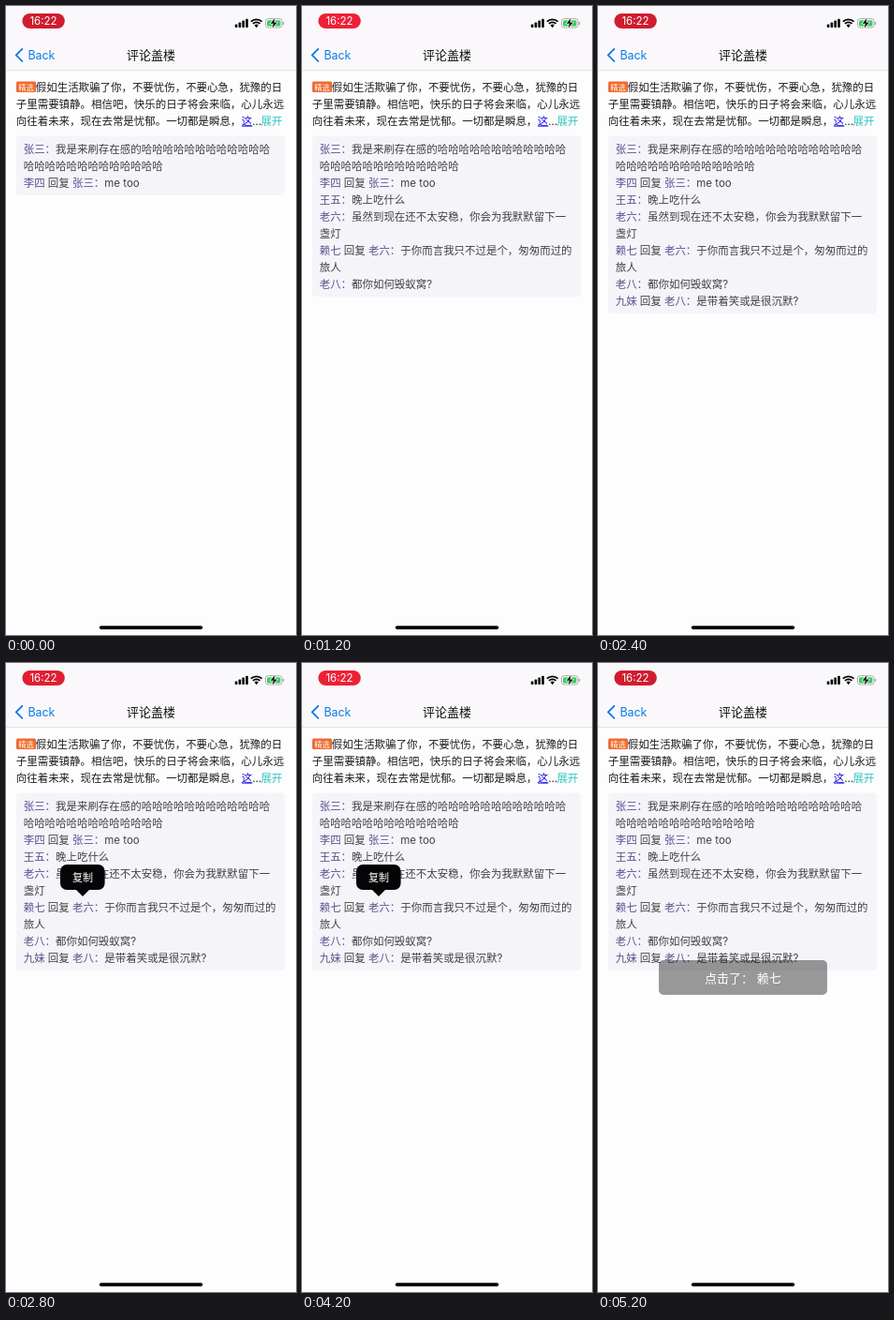
Write an HTML page with a canvas that moves like this. It is 310x671 px and loops after 5.4 s.

```html
<!DOCTYPE html>
<html lang="zh-CN">
<head>
<meta charset="utf-8">
<title>评论盖楼</title>
<style>
html, body { margin: 0; width: 100%; height: 100%; overflow: hidden; background: #fefdfe; }
canvas { display: block; width: 310px; height: 671px; }
</style>
</head>
<body>
<canvas id="stage"></canvas>
<script>
const W = 310, H = 671, LOOP = 5400, STEP = 200;
const CJK = '"Noto Sans CJK SC", "Noto Sans CJK", sans-serif';
const MIXED = 'Inter, ' + CJK;
const SIZE = 11.46, LINE = 18;
const NAME = '#57528c', INK = '#424044', BLUE = '#0b7be6';

// Each comment: time it appears, then its lines; names are wrapped in brackets.
const comments = [
  { at: 0, lines: ['[张三：]我是来刷存在感的' + '哈'.repeat(12), '哈'.repeat(13)] },
  { at: 0, lines: ['[李四] 回复 [张三：]me too'] },
  { at: 400, lines: ['[王五：]晚上吃什么'] },
  { at: 600, lines: ['[老六：]虽然到现在还不太安稳，你会为我默默留下一', '盏灯'] },
  { at: 1000, lines: ['[赖七] 回复 [老六：]于你而言我只不过是个，匆匆而过的', '旅人'] },
  { at: 1200, lines: ['[老八：]都你如何毁蚁窝?'] },
  { at: 1400, lines: ['[九妹] 回复 [老八：]是带着笑或是很沉默?'] }
];

const canvas = document.getElementById('stage');
const ctx = canvas.getContext('2d');
const dpr = window.devicePixelRatio || 1;
canvas.width = Math.round(W * dpr);
canvas.height = Math.round(H * dpr);

function box(x, y, w, h, r, fill) {
  ctx.fillStyle = fill;
  ctx.beginPath();
  ctx.roundRect(x, y, w, h, r);
  ctx.fill();
}

function text(str, x, y, size, color, { align = 'left', weight = 400, family = MIXED } = {}) {
  ctx.font = `${weight} ${size}px ${family}`;
  ctx.textAlign = align;
  ctx.fillStyle = color;
  ctx.fillText(str, x, y);
  return ctx.measureText(str).width;
}

function richLine(str, x, y) {
  for (const part of str.split(/(\[.*?\])/)) {
    if (!part) continue;
    const named = part[0] === '[';
    x += text(named ? part.slice(1, -1) : part, x, y, SIZE, named ? NAME : INK);
  }
}

function poly(points, fill) {
  ctx.fillStyle = fill;
  ctx.beginPath();
  points.forEach(([x, y]) => ctx.lineTo(x, y));
  ctx.closePath();
  ctx.fill();
}

function statusBar(t) {
  const dim = ((1 + Math.cos(2 * Math.PI * (t + 100) / 2600)) / 2) ** 6;
  const mix = (a, b) => Math.round(a + (b - a) * dim);
  box(17.4, 8, 45.4, 16, 8, `rgb(${mix(237, 205)},${mix(33, 28)},${mix(54, 46)})`);
  text('16:22', 40, 20.2, 11.5, '#fff', { align: 'center', family: 'Inter, sans-serif' });

  for (let i = 0; i < 4; i++) {
    const h = 3.6 + i * 1.9;
    box(244.8 + i * 3.8, 23 - h, 2.6, h, 0.7, '#000');
  }

  // Wi-Fi
  ctx.strokeStyle = '#000';
  ctx.lineWidth = 1.8;
  ctx.lineCap = 'butt';
  for (const r of [8.3, 5.3]) {
    ctx.beginPath();
    ctx.arc(267.7, 22.6, r, -Math.PI * 0.75, -Math.PI * 0.25);
    ctx.stroke();
  }
  ctx.fillStyle = '#000';
  ctx.beginPath();
  ctx.moveTo(267.7, 23.2);
  ctx.arc(267.7, 22.6, 3, -Math.PI * 0.75, -Math.PI * 0.25);
  ctx.fill();

  // Battery
  ctx.strokeStyle = '#a5a5a8';
  ctx.lineWidth = 0.9;
  ctx.beginPath();
  ctx.roundRect(277.4, 13.6, 17.6, 9.4, 2.8);
  ctx.stroke();
  box(279, 15.2, 14.4, 6.2, 1.5, '#35ce5c');
  box(295.8, 16.7, 1.3, 3.4, 0.8, '#a5a5a8');
  const bolt = [[287.6, 12.8], [282.6, 18.8], [285.8, 18.8], [284.6, 23.8], [289.8, 17.4], [286.5, 17.4]];
  ctx.lineWidth = 1.4;
  ctx.strokeStyle = '#fff';
  poly(bolt, '#111');
  ctx.stroke();
  poly(bolt, '#111');
}

function navBar() {
  ctx.strokeStyle = BLUE;
  ctx.lineWidth = 1.9;
  ctx.lineCap = ctx.lineJoin = 'round';
  ctx.beginPath();
  ctx.moveTo(17.3, 45.8);
  ctx.lineTo(10.8, 52.3);
  ctx.lineTo(17.3, 58.8);
  ctx.stroke();
  text('Back', 23.4, 57, 12.4, BLUE);
  text('评论盖楼', 155, 57, 13, '#111', { align: 'center', weight: 500, family: CJK });
}

function post() {
  const ink = '#1c1b1d';
  box(11, 80.5, 21, 11.5, 1.5, '#ef6a2c');
  text('精选', 21.5, 89.5, 8.4, '#fff', { align: 'center', family: CJK });
  text('假如生活欺骗了你，不要忧伤，不要心急，犹豫的日', 31.8, 91, SIZE, ink);
  text('子里需要镇静。相信吧，快乐的日子将会来临，心儿永远', 10.8, 109, SIZE, ink);
  text('向往着未来，现在去常是忧郁。一切都是瞬息，', 10.8, 126.7, SIZE, ink);
  text('这', 251.8, 126.7, SIZE, '#1c10e6');
  box(252, 127.6, 11.3, 1, 0, '#1c10e6');
  text('...', 263.3, 126.7, SIZE, ink);
  text('展开', 272.6, 126.7, SIZE, '#30c6c4');
}

function thread(t) {
  const shown = comments.filter(c => t >= c.at);
  const lines = shown.flatMap(c => c.lines);
  const newest = shown[shown.length - 1];
  // A wrapped comment is still unfolding in the step it appears.
  const fold = t === newest.at && newest.lines.length > 1 ? 4.5 : 0;
  const last = lines.length - 1;
  box(11, 138.5, 287, 27.5 + last * LINE - fold, 4, '#f5f4f9');
  lines.forEach((line, i) => {
    richLine(line, 18.7, 156.8 + i * LINE - (i === last ? fold : 0));
  });
}

function copyMenu() {
  box(58, 215, 47.6, 27, 7, '#050507');
  poly([[74.5, 241.5], [89.5, 241.5], [82, 249]], '#050507');
  text('复制', 82, 232.7, 11, '#fff', { align: 'center', family: CJK });
}

function toast(alpha) {
  box(65, 317, 180, 37, 5, `rgba(0,0,0,${alpha})`);
  text('点击了： 赖七', 114, 341.3, 13, '#fff');
}

function draw(now) {
  const t = Math.floor((now % LOOP) / STEP) * STEP;
  ctx.setTransform(dpr, 0, 0, dpr, 0, 0);
  ctx.fillStyle = '#fefdfe';
  ctx.fillRect(0, 0, W, H);
  ctx.fillStyle = '#faf8fb';
  ctx.fillRect(0, 0, W, 68.5);
  ctx.fillStyle = '#cfced1';
  ctx.fillRect(0, 68.5, W, 0.6);

  statusBar(t);
  navBar();
  post();
  thread(t);
  if (t >= 2800 && t < 4400) copyMenu();
  if (t >= 4600) toast(t < 5200 ? 0.5 : 0.4);
  box(99.7, 661.2, 110.6, 3.7, 1.8, '#000');
}

const start = performance.now();
function tick() {
  draw(performance.now() - start);
  requestAnimationFrame(tick);
}
tick();
</script>
</body>
</html>
```
